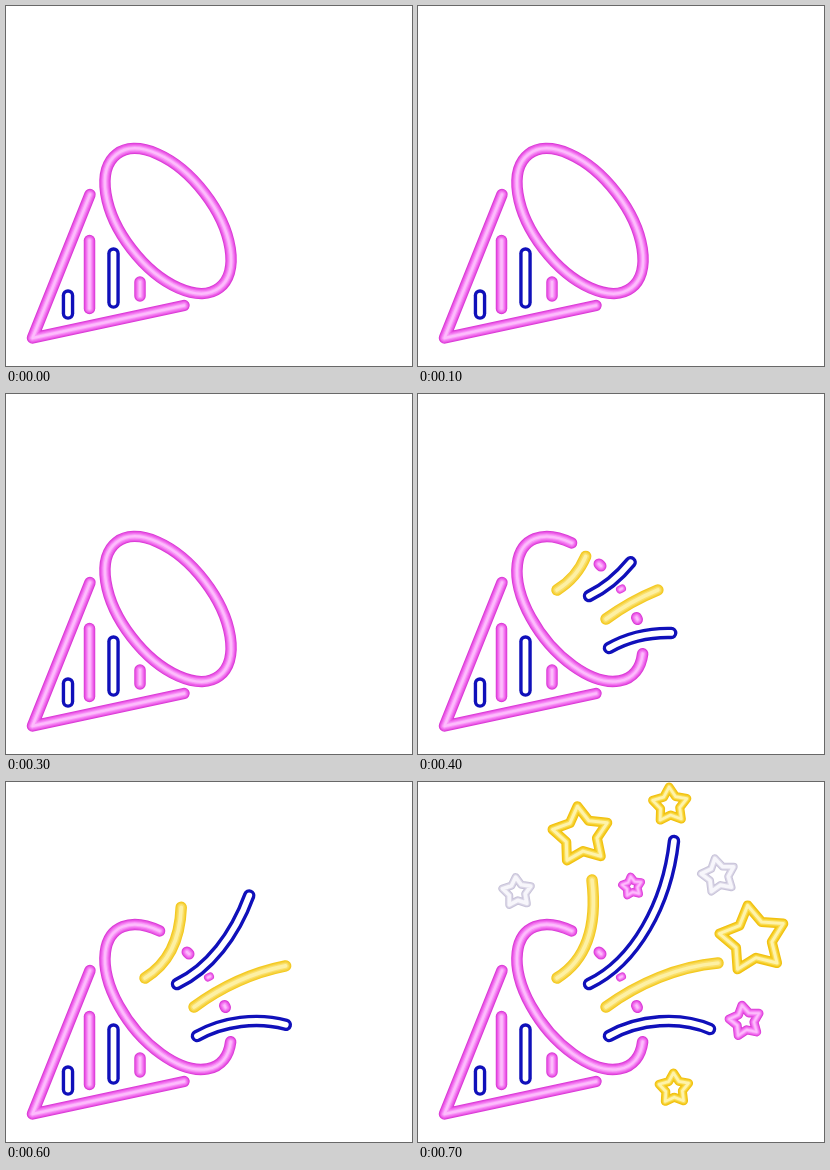
An HTML page with a canvas for the animation above (800 ms loop, 406x360 px).

```html
<!DOCTYPE html>
<html lang="en">
<head>
<meta charset="utf-8">
<title>Party popper</title>
<style>
  html, body { margin: 0; width: 100%; height: 100%; overflow: hidden; background: #fff; }
  canvas { display: block; }
</style>
</head>
<body>
<canvas id="stage" width="406" height="360"></canvas>
<script>
const ctx = document.getElementById('stage').getContext('2d');
const STEP = 100, STEPS = 8;
const TAU = Math.PI * 2, DEG = Math.PI / 180;

// Each tube is a stack of strokes: [share of full width, colour]
const TUBES = {
  pink: [[1, '#da3cd6'], [.82, '#ea58e6'], [.62, '#f376f0'], [.42, '#f998f8'], [.22, '#fdbcfc']],
  yellow: [[1, '#f3c921'], [.8, '#f7d342'], [.56, '#fae06c'], [.32, '#fdf0a4']],
  gold: [[1, '#f0c010'], [.78, '#f6cd24'], [.54, '#fade58'], [.3, '#fef3ac']],
  grey: [[1, '#c8c3d9'], [.74, '#dbd7e7'], [.46, '#f7f6fb']],
  blue: [[1, '#1010ba'], [.46, '#fff']]
};

// Bezier points, then the drawn share at steps 4 to 7
const STREAMERS = [
  ['yellow', [[139, 196], [165, 180], [180, 150], [174, 98]], [.48, .65, .81, 1]],
  ['blue', [[171, 202], [217, 180], [249, 122], [256, 59]], [.34, .52, .7, 1]],
  ['yellow', [[188, 225], [220, 201.5], [260, 184.5], [300, 181]], [.49, .66, .83, 1]],
  ['blue', [[191, 254], [221, 237], [262, 234], [292, 247]], [.61, .74, .87, 1]]
];

// colour, x, y, radius, tilt, line width
const STARS = [
  ['gold', 163, 53, 29, -97, 10],
  ['gold', 252, 23, 18, -93, 9],
  ['grey', 99, 110, 15, -95, 8],
  ['pink', 214, 104.5, 10, -98, 8],
  ['grey', 300.5, 93.5, 17.5, -102, 8],
  ['gold', 335, 157, 34, -99, 10],
  ['pink', 327, 239, 16, -101, 9],
  ['gold', 256, 306.5, 15.5, -92, 9]
];

ctx.lineCap = ctx.lineJoin = 'round';

function tube(name, width, path) {
  for (const [share, color] of TUBES[name]) {
    ctx.strokeStyle = color;
    ctx.lineWidth = width * share;
    ctx.stroke(path);
  }
}

function polyline(points, closed) {
  const path = new Path2D();
  points.forEach(([x, y]) => path.lineTo(x, y));
  if (closed) path.closePath();
  return path;
}

function starPath(x, y, r, tilt) {
  const points = Array.from({ length: 10 }, (_, i) => {
    const a = (tilt + i * 36) * DEG, d = i % 2 ? r * .56 : r;
    return [x + d * Math.cos(a), y + d * Math.sin(a)];
  });
  return polyline(points, true);
}

// First part of a cubic curve, by de Casteljau
function partCurve(points, t) {
  const start = [];
  let row = points;
  while (row.length) {
    start.push(row[0]);
    row = row.slice(1).map((p, i) => p.map((v, k) => row[i][k] + (v - row[i][k]) * t));
  }
  const [a, b, c, d] = start;
  const path = new Path2D();
  path.moveTo(...a);
  path.bezierCurveTo(...b, ...c, ...d);
  return path;
}

function rim(open) {
  const path = new Path2D();
  path.ellipse(162, 215, 84.3, 46, 52.4 * DEG, open ? -29 * DEG : 0, open ? 227 * DEG : TAU);
  if (!open) path.closePath();
  return path;
}

function drawCone(open) {
  tube('pink', 11.5, rim(open));
  tube('pink', 11.5, polyline([[84, 188.5], [26.5, 332], [178, 299.5]]));
  tube('blue', 12.5, polyline([[62, 289.5], [62, 307.5]]));
  tube('pink', 11.5, polyline([[83.5, 234.5], [83.5, 302.5]]));
  tube('blue', 12.5, polyline([[107.5, 247.5], [107.5, 296.5]]));
  tube('pink', 11.5, polyline([[134, 276], [134, 290]]));
}

function drawDots() {
  tube('pink', 11, polyline([[181, 170], [183, 172]]));
  tube('pink', 8, polyline([[202, 195.5], [204, 194.5]]));
  tube('pink', 11, polyline([[218.5, 223.5], [219.5, 225.5]]));
}

function draw(step) {
  const burst = step >= 4;
  ctx.clearRect(0, 0, 406, 360);
  drawCone(burst);
  if (!burst) return;
  drawDots();
  for (const [color, points, shares] of STREAMERS) {
    tube(color, color === 'blue' ? 12.5 : 11.5, partCurve(points, shares[step - 4]));
  }
  if (step < 7) return;
  for (const [color, x, y, r, tilt, width] of STARS) {
    tube(color, width, starPath(x, y, r, tilt));
  }
}

const begin = performance.now();
let shown = -1;

function tick() {
  const step = Math.floor((performance.now() - begin) / STEP) % STEPS;
  if (step !== shown) draw(shown = step);
  requestAnimationFrame(tick);
}
tick();
</script>
</body>
</html>
```
